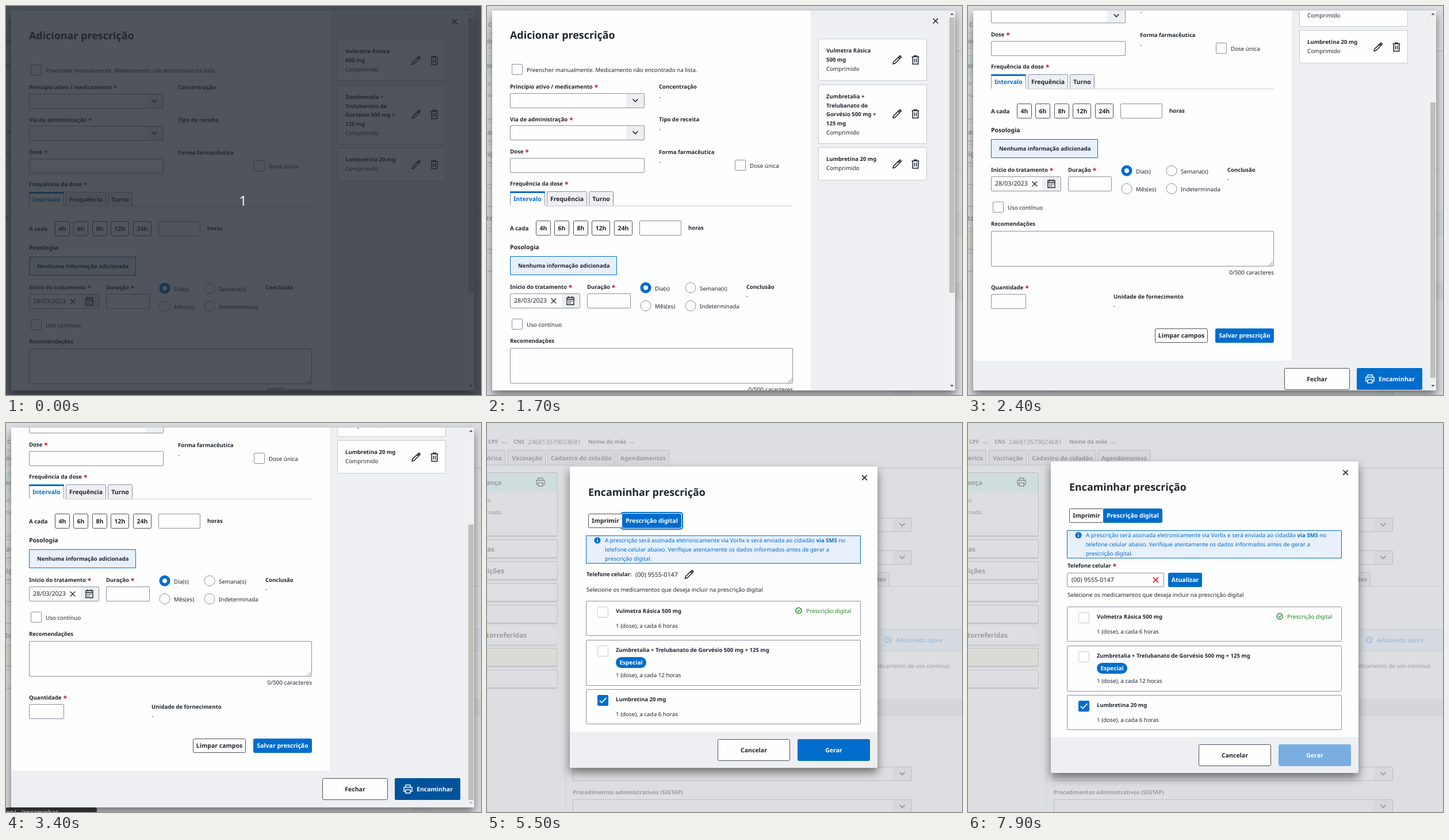
An HTML page with a canvas for the animation above (8 s loop, 826 by 678 pixels).

```html
<!DOCTYPE html>
<html lang="pt-BR">
<head>
<meta charset="utf-8">
<title>Encaminhar prescrição</title>
<style>
html, body { margin: 0; width: 100%; height: 100%; overflow: hidden; background: #dcdee1; }
canvas { display: block; width: 826px; height: 678px; }
</style>
</head>
<body>
<canvas id="stage"></canvas>
<script>
const W = 826, H = 678, LOOP = 8000;
const INK = '#20242e', WHITE = '#fefefe', PANEL = '#eeeff2', BLUE = '#006dcc', DEEP = '#00529a';
const EDGE = '#8b8ea2', SOFT = '#c9cbd1', RED = '#c5161f', GREEN = '#1b871f';
const PAGE = '#dcdee1', PAGE_FILL = '#d6d8dc', PAGE_INK = '#999ca2', PAGE_EDGE = '#bbbec5', PAGE_ICON = '#8c8f95', PAGE_BLUE = '#8bb0d4';
const DRUGS = ['Vulmetra Rásica 500 mg', 'Zumbretalia + Trelubanato de Gorvésio 500 mg + 125 mg', 'Lumbretina 20 mg'];
const PHONE = '(00) 9555-0147';

const canvas = document.getElementById('stage');
const ctx = canvas.getContext('2d');
const dpr = window.devicePixelRatio || 1;
canvas.width = W * dpr;
canvas.height = H * dpr;

const clamp = v => Math.max(0, Math.min(1, v));

function mix(a, b, k) {
  const part = (c, i) => parseInt(c.slice(i, i + 2), 16);
  return `rgb(${[1, 3, 5].map(i => Math.round(part(a, i) * (1 - k) + part(b, i) * k))})`;
}

// y is the visual middle of the line; returns the x where the text ends
function text(s, x, y, { b = false, size = b ? 9.55 : 9.8, color = INK, align = 'left' } = {}) {
  ctx.font = `${b ? 700 : 400} ${size}px "Noto Sans", "Open Sans", sans-serif`;
  ctx.textAlign = align;
  ctx.fillStyle = color;
  ctx.fillText(s, x, y + size * 0.36);
  return x + ctx.measureText(s).width;
}
const bold = (s, x, y, o) => text(s, x, y, { b: true, ...o });
const centered = (s, x, y, color = INK, size = 10.5) => bold(s, x, y, { color, size, align: 'center' });

function required(s, x, y) {
  bold('*', bold(s, x, y) + 3, y + 1, { color: RED, size: 12 });
}

function box(x, y, w, h, { fill, edge, r = 0, lw = 1 } = {}) {
  const i = edge ? lw / 2 : 0;
  ctx.beginPath();
  ctx.roundRect(x + i, y + i, w - 2 * i, h - 2 * i, r);
  if (fill) { ctx.fillStyle = fill; ctx.fill(); }
  if (edge) { ctx.strokeStyle = edge; ctx.lineWidth = lw; ctx.stroke(); }
}

function stroke(d, x, y, color = INK, lw = 1.5) {
  ctx.save();
  ctx.translate(x, y);
  ctx.strokeStyle = color;
  ctx.lineWidth = lw;
  ctx.stroke(new Path2D(d));
  ctx.restore();
}

function dot(x, y, r, color) {
  ctx.beginPath();
  ctx.arc(x, y, r, 0, 7);
  ctx.fillStyle = color;
  ctx.fill();
}

function ring(x, y, r, color, lw = 1) {
  ctx.beginPath();
  ctx.arc(x, y, r, 0, 7);
  ctx.strokeStyle = color;
  ctx.lineWidth = lw;
  ctx.stroke();
}

const chevron = (x, y, color) => stroke('M-4.5 -2.2L0 2.3L4.5 -2.2', x, y, color, 1.6);
const cross = (x, y, n = 4, color = INK, lw = 1.6) => stroke(`M${-n} ${-n}L${n} ${n}M${n} ${-n}L${-n} ${n}`, x, y, color, lw);
const pencil = (x, y) => stroke('M-7 7L-6 3.4L2 -4.6L4.6 -2L-3.4 6ZM-6.8 6.6L-5.6 5.6M3.4 -6L5.2 -7.4L7.4 -5.2L6 -3.4Z', x, y, INK, 1.5);
const trash = (x, y) => stroke('M-6.5 -5.5H6.5M-2.3 -5.5V-7.3H2.3V-5.5M-4.8 -5.5V7.2H4.8V-5.5M-1.6 -2.4V4.2M1.6 -2.4V4.2', x, y, INK, 1.5);
const printer = (x, y, color) => stroke('M-4 -3V-7H4V-3M-4 4H-7V-3H7V4H4M-4 1.2H4V7H-4Z', x, y, color, 1.5);
const calendar = (x, y) => stroke('M-6 -5.5H6V7H-6ZM-6 -2H6M-3 -7.5V-4M3 -7.5V-4M-3.5 1H-2M-.8 1H.8M2 1H3.5M-3.5 4H-2M-.8 4H.8', x, y, INK, 1.4);

function input(x, y, w, h = 26, edge = EDGE) {
  box(x, y, w, h, { fill: WHITE, edge, r: 1.5 });
}

function select(x, y, w) {
  input(x, y, w);
  box(x + w - 32, y + 1, 31, 24, { fill: PANEL });
  chevron(x + w - 16, y + 12.5, INK);
}

function check(x, y, on, edge = EDGE) {
  box(x, y, 19, 19, { fill: on ? BLUE : WHITE, edge: on ? BLUE : edge, r: 1.5 });
  if (on) stroke('M-5.5 0L-2 3.8L6 -4.6', x + 9.5, y + 9.7, WHITE, 1.7);
}

function radio(x, y, label, on) {
  dot(x, y, 9.3, on ? BLUE : WHITE);
  ring(x, y, 9, on ? BLUE : EDGE);
  if (on) dot(x, y, 4, WHITE);
  text(label, x + 16, y + 1);
}

function button(label, x, y, w, h, { fill = WHITE, color = INK, edge = '#4d5059', r = 2 } = {}) {
  box(x, y, w, h, { fill, edge, r });
  centered(label, x + w / 2, y + h / 2, color);
}
const primary = (label, x, y, w, h, fill = BLUE) => button(label, x, y, w, h, { fill, edge: fill, color: WHITE });

function tooltip(label, x, y, w, alpha) {
  if (alpha <= 0) return;
  const old = ctx.globalAlpha;
  ctx.globalAlpha = old * alpha;
  box(x, y, w, 28, { fill: '#4b4e53', r: 2 });
  centered(label, x + w / 2, y + 14, WHITE);
  ctx.globalAlpha = old;
}

function shadowed(x, y, w, h, fill) {
  ctx.save();
  ctx.shadowColor = 'rgba(0,0,0,.5)';
  ctx.shadowBlur = 16 * dpr;
  ctx.shadowOffsetY = 8 * dpr;
  box(x, y, w, h, { fill, r: 2 });
  ctx.restore();
}

function fadedSelect(y) {
  box(149, y, 590, 25, { edge: PAGE_EDGE, r: 1.5 });
  box(706, y + 1, 32, 23, { fill: PAGE_FILL });
  chevron(722, y + 12, PAGE_ICON);
}

// Dimmed page under the dialogs
function page() {
  box(0, 0, W, H, { fill: PAGE });
  const pale = { color: PAGE_INK };
  bold('CPF', 2, 33, pale);
  text('—', 25, 33, pale);
  bold('CNS', 46, 33, pale);
  text('246813579024681', 71, 33, { size: 10.8, ...pale });
  bold('Nome da mãe', 176, 33, pale);
  text('—', 247, 33, pale);

  const tabs = [[-40, 72, 'Histórico'], [36, 66, 'Vacinação'], [105, 118, 'Cadastro do cidadão'], [226, 91, 'Agendamentos']];
  for (const [x, w, s] of tabs) {
    box(x, 47, w, 27, { fill: PAGE_FILL, edge: PAGE_EDGE, r: 2 });
    bold(s, x + w - 6, 61, { size: 10.45, align: 'right', ...pale });
  }
  box(0, 73, W, 6, { fill: PAGE });
  box(0, 73, W, 1, { fill: PAGE_EDGE });
  box(136, 74, 1, H, { fill: '#cdd0d4' });
  box(149, 74, 700, 5, { edge: PAGE_EDGE });
  box(150, 73, W, 5, { fill: PAGE });

  const cards = [[86, 112, ''], [203, 33, 'as', 13], [241, 33, 'ições', 30], [279, 33, ''], [317, 33, ''], [353, 35, 'torreferidas', 69], [392, 33, ''], [430, 33, '']];
  for (const [y, h, s, end] of cards) {
    box(-5, y + 1, 128, h, { fill: '#c9cbcf', r: 2 });
    box(-5, y, 128, h - 1, { fill: y === 392 ? '#dcdad5' : PAGE, edge: y === 353 ? '#d0d2d5' : PAGE_EDGE, r: 2 });
    if (s) bold(s, end, y + 16.5, { size: 11.7, align: 'right', ...pale });
  }
  box(0, 87, 122, 33, { fill: '#d0dddd' });
  bold('ança', 25, 104, { size: 11.2, align: 'right', ...pale });
  printer(93, 103, PAGE_ICON);
  text('lo', 7, 134, { align: 'right', ...pale });
  text('mado', 25, 155, { align: 'right', ...pale });

  bold('Intervenções e/ou procedimentos clínicos realizados', 149, 121, { size: 11.9, ...pale });
  fadedSelect(165);
  fadedSelect(222);
  box(600, 260, 100, 25, { fill: PAGE_FILL, edge: PAGE_EDGE, r: 2 });
  bold('tos', 694, 272, { size: 10.5, align: 'right', ...pale });
  box(149, 284, W, 1, { fill: '#c9cbd0' });
  box(149, 359, 700, 39, { fill: '#d6dbe1', edge: '#c4cbd4' });
  ring(698, 378, 5, PAGE_BLUE, 1.2);
  stroke('M0 -3V0L2 1.5', 698, 378, PAGE_BLUE, 1.1);
  text('Adicionado agora', 711, 378, { color: PAGE_BLUE });
  text('Medicamento de uso contínuo', 805, 423, { align: 'right', ...pale });
  box(149, 480, W, 31, { fill: '#d4d6da' });
  dot(159, 554, 9.3, '#88a8c8');
  dot(159, 554, 4, PAGE);
  text('Consulta no dia', 174, 554, pale);
  ring(271, 554, 9, PAGE_EDGE);
  text('Urgência', 287, 554, pale);
  bold('Atendimento compartilhado', 149, 587, pale);
  fadedSelect(599);
  bold('Procedimentos administrativos (SIGTAP)', 149, 644, pale);
  fadedSelect(656);
}

function prescriptionForm() {
  box(9, -9, 554, 831, { fill: WHITE });
  bold('Adicionar prescrição', 40, 51, { size: 17.9 });
  cross(780, 26, 4.3);
  check(43, 101);
  text('Preencher manualmente. Medicamento não encontrado na lista.', 69, 111);

  required('Princípio ativo / medicamento', 40, 141);
  select(40, 152, 234);
  required('Via de administração', 40, 198);
  select(40, 208, 234);
  required('Dose', 40, 254);
  input(40, 265, 234);
  ['Concentração', 'Tipo de receita', 'Forma farmacêutica'].forEach((s, i) => {
    bold(s, 299, 141 + i * 56.6);
    text('-', 299, 158 + i * 56.6);
  });
  check(431, 268);
  text('Dose única', 457, 278);

  required('Frequência da dose', 40, 310);
  box(40, 348, 492, 1, { fill: SOFT });
  for (const [s, x, w] of [['Frequência', 104, 70], ['Turno', 177, 43]]) {
    box(x, 323, w, 26, { fill: PANEL, edge: EDGE, r: 2 });
    box(x + 1, 347, w - 2, 2, { fill: PANEL });
    box(x, 348, w, 1, { fill: SOFT });
    centered(s, x + w / 2, 336.5);
  }
  box(40, 323, 61, 29, { fill: WHITE, edge: EDGE, r: 2 });
  box(40, 323, 61, 3, { fill: BLUE, r: 1 });
  box(39, 348, 63, 5, { fill: WHITE });
  centered('Intervalo', 70.5, 336.5, BLUE);

  bold('A cada', 40, 387, { size: 9.8 });
  [['4h', 85, 26], ['6h', 117, 26], ['8h', 150, 26], ['12h', 182, 32], ['24h', 221, 32]]
    .forEach(([s, x, w]) => button(s, x, 374, w, 26));
  input(265, 374, 73);
  bold('horas', 350, 387);

  bold('Posologia', 40, 420, { size: 10.5 });
  box(40, 436, 186, 33, { fill: '#e7f0fb', edge: BLUE });
  bold('Nenhuma informação adicionada', 54, 453);

  required('Início do tratamento', 40, 490);
  input(40, 501, 122);
  text('28/03/2023', 47, 513.5, { size: 10.7 });
  cross(116, 514, 4.3, INK, 1.3);
  box(130, 502, 31, 24, { fill: PANEL });
  calendar(145, 513.5);
  required('Duração', 174, 490);
  input(174, 501, 76);
  radio(276, 491, 'Dia(s)', true);
  radio(354, 491, 'Semana(s)');
  radio(276, 522.5, 'Mês(es)');
  radio(354, 522.5, 'Indeterminada');
  bold('Conclusão', 451, 490);
  text('-', 451, 505);
  check(43, 545);
  text('Uso contínuo', 69, 555);

  bold('Recomendações', 40, 584);
  input(40, 596, 492, 62);
  stroke('M-7 0L0 -7M-3.5 0L0 -3.5', 530.5, 656.5, '#777', 0.9);
  text('0/500 caracteres', 532, 668, { size: 10, align: 'right' });

  required('Quantidade', 40, 695);
  input(40, 706, 61);
  bold('Unidade de fornecimento', 253, 711);
  text('-', 253, 726);
  button('Limpar campos', 325, 766, 92, 25);
  primary('Salvar prescrição', 430, 766, 102, 25);
}

function prescriptionCards() {
  const cards = [
    [57, 73, 94, ['Vulmetra Rásica', '500 mg']],
    [137, 103, 188, ['Zumbretalia +', 'Trelubanato de', 'Gorvésio 500 mg +', '125 mg']],
    [246, 58, 275.5, [DRUGS[2]]],
  ];
  for (const [y, h, mid, lines] of cards) {
    box(576, y, 189, h, { fill: WHITE, edge: SOFT });
    lines.forEach((s, i) => bold(s, 590, y + 21 + i * 15.4));
    text('Comprimido', 590, y + 21.2 + lines.length * 15.5);
    pencil(713, mid);
    trash(745, mid);
  }
}

function formDialog(scroll, hover, alpha) {
  ctx.save();
  ctx.globalAlpha = alpha;
  shadowed(9, 8, 805, 662, PANEL);
  ctx.save();
  ctx.beginPath();
  ctx.rect(9, 8, 805, 662);
  ctx.clip();
  ctx.translate(0, 1 - scroll);
  prescriptionForm();
  prescriptionCards();
  button('Fechar', 550, 835, 114, 38);
  box(676, 835, 114, 38, { fill: mix(BLUE, DEEP, hover), r: 2 });
  printer(699, 854, WHITE);
  bold('Encaminhar', 714, 854, { size: 10.5, color: WHITE });
  ctx.restore();

  box(803, 8, 11, 662, { fill: '#f0f0f1' });
  box(804, 20 + Math.round(Math.max(0, scroll - 1) * 0.726), 9, 480, { fill: '#bebfbb' });
  const arrow = (y, dir, live) => {
    ctx.fillStyle = live ? '#45474a' : '#a8a9ab';
    ctx.fill(new Path2D(`M805.5 ${y - dir}h6l-3 ${dir * 3.2}z`));
  };
  arrow(14.5, -1, scroll > 0);
  arrow(661.5, 1, scroll < 217);
  ctx.restore();
}

function statusBar() {
  box(0, 670, 158, 12, { fill: '#2c2c2f', r: 2 });
  text('on/…/encaminhar', 0, 678, { size: 10.8, color: '#cfcfd2' });
}

function medicineList(y, onlyLast) {
  const rows = [
    { top: 0, h: 61, box: 10, name: 17.5, dose: 43, every: 6 },
    { top: 68, h: 80, box: 78, name: 85.5, dose: 129.5, every: 12 },
    { top: 154, h: 61, box: 164, name: 172, dose: 197, every: 6 },
  ];
  rows.forEach((row, i) => {
    box(172, y + row.top, 478, row.h, { fill: WHITE, edge: EDGE, r: 1 });
    check(192, y + row.box, !onlyLast || i === 2, SOFT);
    bold(DRUGS[i], 224, y + row.name);
    text(`1 (dose), a cada ${row.every} horas`, 224, y + row.dose);
  });
  ring(542, y + 17, 5, GREEN, 1.4);
  stroke('M-2.4 0L-.6 1.9L2.6 -1.7', 542, y + 17, GREEN, 1.3);
  text('Prescrição digital', 555, y + 17, { color: GREEN });
  box(224, y + 98, 53, 19, { fill: BLUE, r: 9.5 });
  centered('Especial', 250.5, y + 107.5, WHITE, 10);
}

function notice(y) {
  box(172, y, 478, 49, { fill: '#e7f0fb', edge: BLUE });
  dot(192, y + 8.5, 5.5, BLUE);
  box(191.2, y + 8, 1.6, 3.6, { fill: WHITE });
  box(191.2, y + 5.2, 1.6, 1.6, { fill: WHITE });
  const color = { color: BLUE };
  let x = text('A prescrição será assinada eletronicamente via Vorlix e será enviada ao cidadão ', 205, y + 8.5, color);
  x = bold('via SMS', x, y + 8.5, color);
  text(' no', x, y + 8.5, color);
  text('telefone celular abaixo. Verifique atentamente os dados informados antes de gerar a', 205, y + 24, color);
  text('prescrição digital.', 205, y + 40, color);
}

const LAYOUTS = {
  print: { top: 123, list: 264, foot: 227, pick: 250 },
  send: { top: 76, list: 310, foot: 228, pick: 290 },
  edit: { top: 67, list: 320, foot: 227, pick: 299.5 },
};

function forwardDialog(t, alpha) {
  const mode = t < 5300 ? 'print' : t < 7300 ? 'send' : 'edit';
  const { top, list, foot, pick } = LAYOUTS[mode];
  const digital = mode !== 'print';
  const footY = list + foot;
  const step = (from, len) => clamp((t - from + 100) / len);
  const tabs = top + 82;

  ctx.save();
  ctx.globalAlpha = alpha;
  shadowed(144, top, 535, footY + 63 - top, PANEL);
  box(144, top, 535, footY - top, { fill: WHITE, r: 2 });
  bold('Encaminhar prescrição', 176, top + 44.5, { size: 17.85 });
  if (!digital) box(639, top + 4, 35, 29, { fill: WHITE, edge: BLUE, lw: 2, r: 3 });
  cross(656.5, top + 19.3, 4.3);

  const k = digital ? step(5300, 300) : 0;
  const left = mix(BLUE, WHITE, k);
  const rest = mix(WHITE, '#eef2f1', t >= 4800 ? step(4800, 200) : 0);
  if (mode === 'send') box(232, tabs - 3, 109, 31, { fill: WHITE, edge: BLUE, lw: 2, r: 4 });
  button('Imprimir', 176, tabs, 60, 25, { fill: left, edge: k > 0.5 ? '#4d5059' : BLUE, color: mix(WHITE, INK, k) });
  button('Prescrição digital', 235, tabs, 103, 25, {
    fill: digital ? mix('#eef2f1', BLUE, k) : rest,
    edge: k > 0.5 ? BLUE : '#4d5059',
    color: mix(INK, WHITE, k),
  });

  text(digital ? 'Selecione os medicamentos que deseja incluir na prescrição digital' : 'Selecione os medicamentos que deseja imprimir', 173, pick);
  if (digital) notice(top + 120);
  medicineList(list, digital);

  if (mode === 'send') {
    bold('Telefone celular:', 173, 264);
    text(PHONE, 258, 264, { size: 10.7 });
    const over = t >= 6900 ? (t < 7000 ? 0.9 : 1) : 0;
    if (over) box(336, 252, 31, 24, { fill: mix(WHITE, '#e8e9eb', over), r: 2 });
    pencil(351.5, 264);
    tooltip('Editar', 330, 222, 44, over);
  }
  if (mode === 'edit') {
    const leave = t >= 7800 ? step(7800, 200) : 0;
    required('Telefone celular', 173, 249);
    input(172, 261, 169, 25);
    text(PHONE, 180, 273, { size: 10.7 });
    cross(326.5, 273.5, 4.5, mix('#d8313b', RED, leave), 1.7);
    primary('Atualizar', 348, 261, 59, 25, mix(DEEP, BLUE, leave));
  }

  button('Cancelar', 401, footY + 13, 126, 38);
  const off = mode === 'edit' ? step(7300, 300) : 0;
  primary(digital ? 'Gerar' : 'Imprimir', 540, footY + 13, 126, 38, mix(BLUE, '#7aaee0', off));
  if (t >= 3700) tooltip('Fechar', 633.5, 100.5, 47, t < 4100 ? 1 : t < 4200 ? 0.5 : 0);
  ctx.restore();
}

function draw(now) {
  const t = Math.floor((now % LOOP) / 100) * 100;
  ctx.setTransform(dpr, 0, 0, dpr, 0, 0);
  ctx.textRendering = 'geometricPrecision';
  page();

  if (t < 3600) {
    const p = clamp((t - 1700) / 800);
    const scroll = t < 1700 ? 0 : Math.round(1 + 216 * Math.pow(p * p * (3 - 2 * p), 1.33));
    formDialog(scroll, clamp((t - 2900) / 300), t < 3500 ? 1 : 0.5);
  }
  if (t >= 3600) forwardDialog(t, clamp((t - 3500) / 300));
  if (t >= 3100 && t < 3900) statusBar();

  if (t < 100) {
    box(0, 0, W, H, { fill: 'rgba(33,40,48,.79)' });
    text('1', 412, 339, { size: 24, color: '#f7f8f2', align: 'center' });
  }
}

const start = performance.now();
function loop() {
  draw(performance.now() - start);
  requestAnimationFrame(loop);
}
loop();
</script>
</body>
</html>
```
